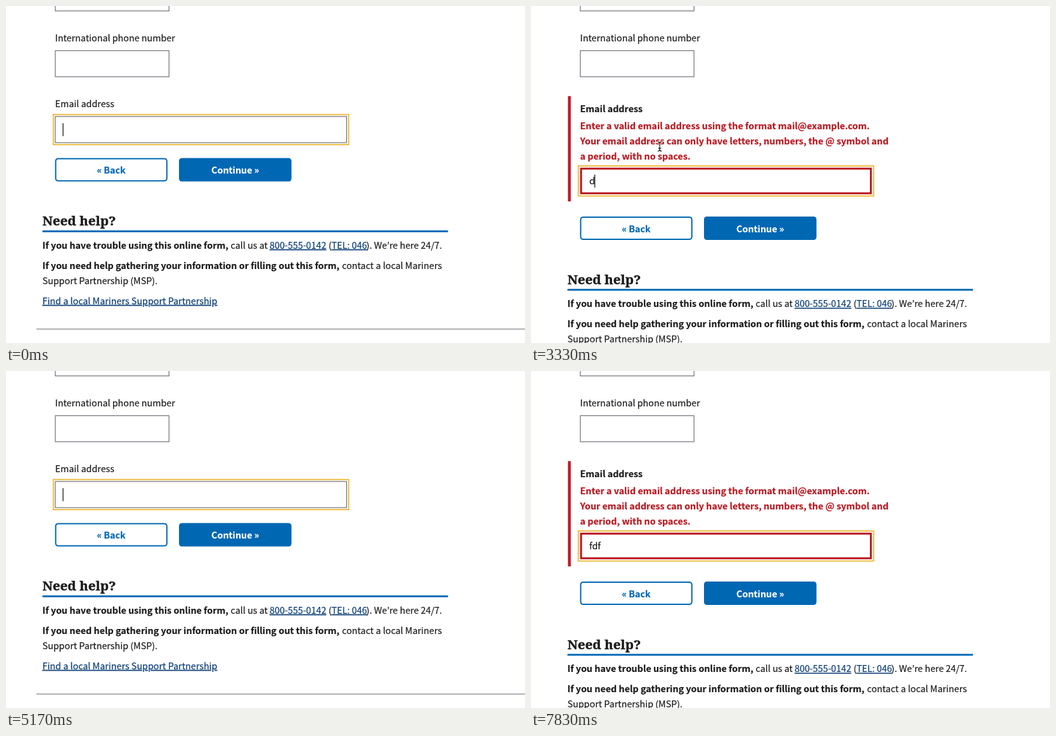
An HTML page for the animation above (8000 ms loop, 819 by 533 pixels).

```html
<!DOCTYPE html>
<html lang="en">
<head>
<meta charset="utf-8">
<title>Contact form</title>
<style>
html, body { margin: 0; width: 100%; height: 100%; overflow: hidden; background: #fff; }
svg { display: block; width: 819px; height: 533px; color: #1b1b1b; }
text {
  font-family: "Noto Sans CJK KR", "Noto Sans CJK JP", "Noto Sans CJK SC", "Noto Sans", sans-serif;
  font-size: 14.32px;
}
text, tspan { fill: currentColor; stroke: currentColor; stroke-width: .18px; }
.b { font-weight: 700; }
.mid { text-anchor: middle; }
.blue { color: #0067b3; }
.white { color: #fff; }
.red { color: #b91820; }
.link { color: #083b73; text-decoration: underline; }
.title { font: 700 20.6px "Noto Serif", serif; stroke-width: .4px; }
.box { fill: #fff; stroke: #54555f; stroke-width: 1; }
.focus { fill: none; stroke: #efbb45; stroke-width: 2; }
.bad { fill: #fff; stroke: #b8141d; stroke-width: 3; }
.caret { fill: #1b1b1b; }
</style>
</head>
<body>
<svg viewBox="0 0 819 533" xmlns="http://www.w3.org/2000/svg">
  <rect width="819" height="533" fill="#fff"/>
  <rect class="box" x="77.8" y="-33.5" width="179.4" height="41.3"/>
  <text x="77.5" y="56">International phone number</text>
  <rect class="box" x="77.8" y="70.7" width="179.4" height="41.2"/>

  <g id="plain">
    <text x="77.5" y="160">Email address</text>
    <rect class="focus" x="74.7" y="171.7" width="466" height="47.5"/>
    <rect class="box" x="77.8" y="174.8" width="459.6" height="41.3"/>
  </g>

  <g id="error">
    <rect x="58.3" y="142.5" width="4.5" height="166.5" fill="#c01a26"/>
    <text class="b" x="77.5" y="168">Email address</text>
    <g class="red b">
      <text x="77.5" y="195">Enter a valid email address using the format mail@example.com.</text>
      <text x="77.5" y="219">Your email address can only have letters, numbers, the @ symbol and</text>
      <text x="77.5" y="243">a period, with no spaces.</text>
    </g>
    <rect class="focus" x="74.7" y="253" width="466" height="47.5"/>
    <rect class="bad" x="79" y="257.2" width="457.3" height="39"/>
    <text id="value" x="92" y="282"></text>
  </g>
  <rect id="caret" class="caret" width="1.3" height="20.5"/>

  <g id="lower">
    <rect x="78.4" y="241.4" width="175.4" height="35.2" rx="4" fill="#fff" stroke="#0067b3" stroke-width="2"/>
    <text class="b blue mid" x="166" y="265">« Back</text>
    <rect x="273" y="240.5" width="177.5" height="37" rx="4.5" fill="#0067b3"/>
    <text class="b white mid" x="361.7" y="265">Continue »</text>

    <text class="title" x="57.5" y="347">Need help?</text>
    <rect x="57.5" y="354.9" width="640" height="2.9" fill="#0067b3"/>
    <text y="383.8"><tspan class="b" x="57.5">If you have trouble using this online form,</tspan><tspan
      x="354.6">call us at</tspan><tspan class="link" x="416">800-555-0142</tspan><tspan
      x="509">(</tspan><tspan class="link" x="513.8">TEL: 046</tspan><tspan
      x="568.8">).</tspan><tspan x="580.8">We’re here 24/7.</tspan></text>
    <text y="415.8"><tspan class="b" x="57.5">If you need help gathering your information or filling out this form,</tspan><tspan
      x="530.2">contact a local Mariners</tspan></text>
    <text x="57.5" y="439.8">Support Partnership (MSP).</text>
    <text class="link" x="57.5" y="471.8">Find a local Mariners Support Partnership</text>
    <rect x="48" y="510" width="771" height="1.8" fill="#a9a9ab"/>
  </g>

  <g id="pointer" fill="none" stroke-linecap="round">
    <path id="halo" stroke="#fff" stroke-width="2.6"/>
    <path id="beam" stroke="#111" stroke-width="1.2"/>
  </g>
</svg>
<script>
const LOOP = 8000, STEP = 1000 / 6, SHIFT = 92.5;
const $ = id => document.getElementById(id);

// time, typed text, caret visible
const steps = [
  [0, "", 1],
  [170, "d", 1],
  [4500, "", 1],
  [5500, "f", 1],
  [5670, "fd", 1],
  [5830, "fdf", 1],
  [6830, "fdf", 0],
  [7330, "fdf", 1],
  [7830, "fdf", 0]
];
const caretX = { "": 89.4, d: 100, f: 96.6, fd: 105.2, fdf: 109.2 };
const move = { start: 2500, end: 3500, hide: 4500, from: [200.3, 213.8], to: [203.3, 222.8] };

const shape = "M-2.8-7.3Q0-7.3 0-5Q0-7.3 2.8-7.3M0-5V5M-2.8 7.3Q0 7.3 0 5Q0 7.3 2.8 7.3M-1.8 3H1.8";
$("halo").setAttribute("d", shape);
$("beam").setAttribute("d", shape);

const show = (id, on) => $(id).setAttribute("visibility", on ? "visible" : "hidden");

function drawForm(t) {
  const [, text, caret] = steps.filter(s => s[0] <= t).pop();
  const invalid = text !== "";
  show("plain", !invalid);
  show("error", invalid);
  show("caret", caret);
  $("value").textContent = text;
  $("caret").setAttribute("x", caretX[text]);
  $("caret").setAttribute("y", invalid ? 266.5 : 185.3);
  $("lower").setAttribute("transform", `translate(0 ${invalid ? SHIFT : 0})`);
}

function drawPointer(t) {
  const { start, end, hide, from, to } = move;
  show("pointer", t >= start && t < hide);
  const tick = Math.floor((t - start + 4) / STEP) * STEP;
  const p = Math.min(1, Math.max(0, tick / (end - start)));
  const ease = p * p * (3 - 2 * p);
  const [x, y] = from.map((a, i) => a + (to[i] - a) * ease);
  $("pointer").setAttribute("transform", `translate(${x} ${y})`);
}

const origin = performance.now();
function frame() {
  const t = (performance.now() - origin) % LOOP;
  drawForm(t);
  drawPointer(t);
  requestAnimationFrame(frame);
}
frame();
</script>
</body>
</html>
```
